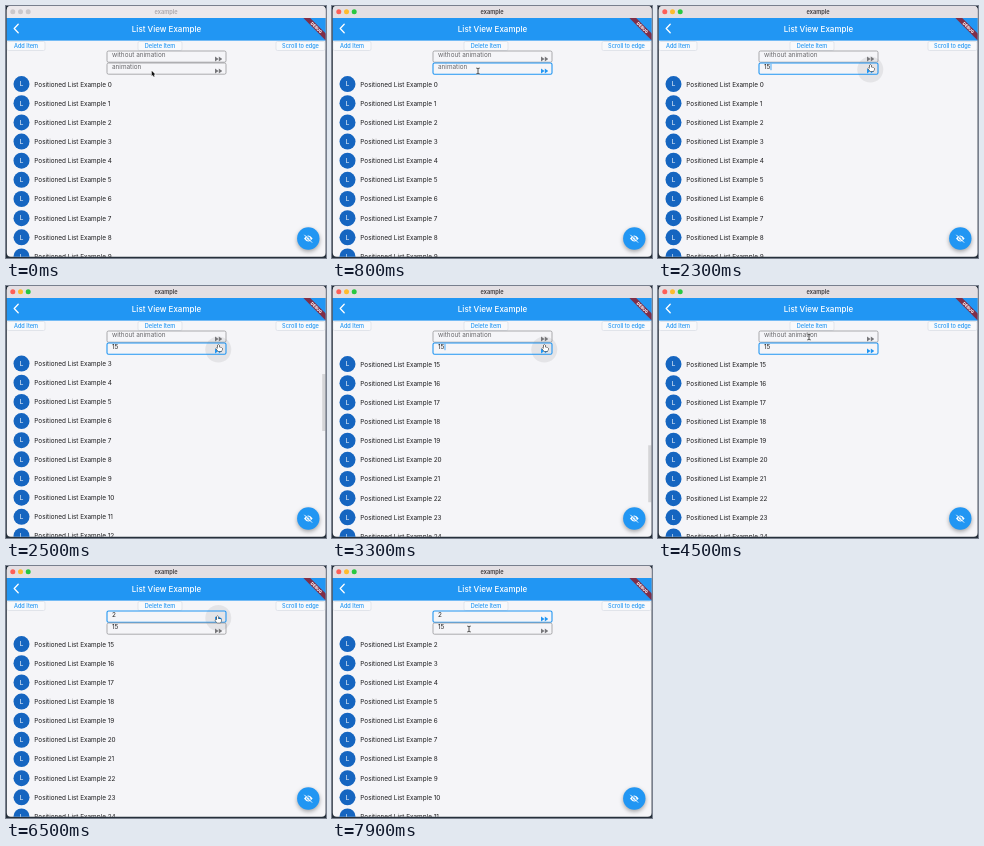
Recreate the animation shown at these times as an HTML page with a canvas. Size 320 by 252 pixels, loop 8 s.

```html
<!DOCTYPE html>
<html lang="en">
<head>
<meta charset="utf-8">
<title>List View Example</title>
<style>
html, body { margin: 0; width: 100%; height: 100%; overflow: hidden; background: #26303b; }
canvas { display: block; width: 320px; height: 252px; }
</style>
</head>
<body>
<canvas id="stage"></canvas>
<script>
const LOOP = 8000, W = 320, H = 252, ROW = 19.15, LIST_TOP = 69;
const BLUE = '#2196f3', PAPER = '#f5f5f8', TAU = Math.PI * 2;
const FONT = 'Inter, "Liberation Sans", sans-serif';
const canvas = document.getElementById('stage');
const g = canvas.getContext('2d');
const dpr = window.devicePixelRatio || 1;
canvas.width = W * dpr;
canvas.height = H * dpr;

// Pointer path: time, x, y
const path = [
  [0, 146, 66], [300, 146, 65], [1750, 146, 65], [2200, 213, 62], [3850, 213, 62],
  [4500, 151, 51], [5850, 151, 51], [6350, 212, 53.5], [7050, 212, 53.5], [7700, 137, 63], [LOOP, 137, 63]
];
const clamp = v => Math.min(1, Math.max(0, v));
const ease = p => p * p * (3 - 2 * p);
const ramp = (t, a, b) => clamp((t - a) / (b - a));

function pointerAt(t) {
  const i = Math.max(1, path.findIndex(k => k[0] >= t));
  const [a, b] = [path[i - 1], path[i]];
  const p = ease(ramp(t, a[0], b[0]));
  return [a[1] + (b[1] - a[1]) * p, a[2] + (b[2] - a[2]) * p];
}

function text(s, x, y, size, color, weight = 400, align = 'left') {
  g.font = `${weight} ${size}px ${FONT}`;
  g.fillStyle = color;
  g.textAlign = align;
  g.textBaseline = 'alphabetic';
  g.fillText(s, x, y);
}
function rect(x, y, w, h, color) {
  g.fillStyle = color;
  g.fillRect(x, y, w, h);
}
function disc(x, y, r, color) {
  g.fillStyle = color;
  g.beginPath();
  g.arc(x, y, r, 0, TAU);
  g.fill();
}
function shape(d, x, y, fill, stroke, width = 1) {
  const p = new Path2D(d);
  g.save();
  g.translate(x, y);
  g.lineWidth = width;
  g.lineCap = g.lineJoin = 'round';
  if (stroke) { g.strokeStyle = stroke; g.stroke(p); }
  if (fill) { g.fillStyle = fill; g.fill(p); }
  g.restore();
}

function list(offset, thumb) {
  g.save();
  g.beginPath();
  g.rect(0, LIST_TOP, W, H - LIST_TOP);
  g.clip();
  const first = Math.max(0, Math.floor(offset) - 1);
  for (let i = first; i < Math.min(31, first + 13); i++) {
    const y = 78.1 + (i - offset) * ROW;
    disc(15.5, y, 8, '#1565c0');
    text('L', 15.5, y + 2.3, 6.4, '#fff', 400, 'center');
    text('Positioned List Example ' + i, 28.3, y + 2.4, 6.4, '#1d1d1f');
  }
  if (thumb > 0) rect(316.2, LIST_TOP + 1 + offset * 5.95, 3.2, 57, `rgba(0,0,0,${0.13 * thumb})`);
  g.restore();
}

function button(label, x, w) {
  g.fillStyle = '#f8f9fb';
  g.strokeStyle = '#d3d9e1';
  g.lineWidth = 0.6;
  g.beginPath();
  g.roundRect(x, 35.5, w, 9, 1.5);
  g.fill();
  g.stroke();
  text(label, x + w / 2, 42.3, 5.6, BLUE, 500, 'center');
}

function field(y, value, hint, focused, caret) {
  g.strokeStyle = focused ? BLUE : '#8b8b8e';
  g.lineWidth = focused ? 1.1 : 0.7;
  g.beginPath();
  g.roundRect(101, y, 119, 11.2, 1.5);
  g.stroke();
  text(value || hint, 106, y + 6.1, 6.4, value ? '#222' : '#67676a');
  if (focused && caret) {
    rect(106.2 + (value ? g.measureText(value).width : 0), y + 0.8, 0.8, 6.4, BLUE);
  }
  shape('M0 0L3.5 2.5L0 5ZM3.8 0L7.3 2.5L3.8 5Z', 209, y + 5.6, focused ? BLUE : '#77777a');
}

function chrome(active) {
  rect(0, 0, W, 12, active ? '#e3dfe3' : '#ece9ec');
  const lights = active ? ['#ff5f57', '#febc2e', '#28c840'] : ['#cbc8cb', '#cbc8cb', '#cbc8cb'];
  lights.forEach((c, i) => disc(6.8 + i * 7.7, 5.8, 2.5, c));
  text('example', 160, 8.1, 5.6, active ? '#3d3a3d' : '#aaa6aa', 600, 'center');
  rect(0, 12, W, 22.6, BLUE);
  shape('M4 0L0 4.2L4 8.4', 8.2, 18.3, null, '#fff', 1.3);
  text('List View Example', 160.5, 25.7, 8, '#fff', 500, 'center');
  g.save();
  g.beginPath();
  g.rect(0, 12, W, 40);
  g.clip();
  g.translate(320, 12);
  g.rotate(Math.PI / 4);
  rect(-18, 11.2, 36, 4.8, 'rgba(150,20,30,.8)');
  text('DEBUG', 0, 15.1, 4.1, '#fff', 800, 'center');
  g.restore();
}

function fab() {
  g.save();
  g.shadowColor = 'rgba(0,0,0,.35)';
  g.shadowBlur = 4 * dpr;
  g.shadowOffsetY = 1.8 * dpr;
  disc(302.3, 232.5, 11.2, BLUE);
  g.restore();
  const eye = 'M-4.3 0Q0 -6.2 4.3 0Q0 6.2 -4.3 0Z';
  shape(eye, 302.3, 232.5, '#fff');
  disc(302.3, 232.5, 2, BLUE);
  disc(302.3, 232.5, 1.2, '#fff');
  shape('M-3.2 -4L4 3.2', 302.3, 232.5, null, BLUE, 1);
  shape('M-3.7 -3.4L3.5 3.8', 302.3, 232.5, null, '#fff', 0.9);
}

function pointer(x, y, kind) {
  if (kind === 'arrow') {
    shape('M0 0V5.2L1.2 4.1L2 6L2.9 5.6L2.1 3.8H3.7Z', x - 0.3, y - 1.2, '#111', '#fff', 0.9);
  } else if (kind === 'beam') {
    const d = 'M-1.4 -2.9Q0 -2.9 0 -2Q0 -2.9 1.4 -2.9M0 -2V2M-1.4 2.9Q0 2.9 0 2Q0 2.9 1.4 2.9';
    shape(d, x, y, null, 'rgba(255,255,255,.7)', 1.6);
    shape(d, x, y, null, '#222', 0.8);
  } else {
    shape('M-1.2 -3Q-.5 -3.9 .1 -3V-.8L2.4 -.4Q3.3 -.1 3.2 .9L2.5 3.2H-.9L-3 .6Q-2.7 -.5 -1.2 .6Z',
      x, y, '#fff', '#222', 1);
  }
}

function draw(t) {
  const active = t >= 350;
  const upper = t >= 4750;
  const low = t < 1150 ? '' : t < 1400 ? '1' : '15';
  const high = t < 5750 ? '' : '2';
  const caret = t % 1000 < 450;
  const offset = t < 6650 ? 15 * ease(ramp(t, 2400, 2750)) : 2;
  const thumb = t < 6650 ? ramp(t, 2400, 2500) * (1 - ramp(t, 3400, 3700))
                         : 1 - ramp(t, 7250, 7550);
  const [x, y] = pointerAt(t);
  const inside = x > 203 && x < 221;

  g.setTransform(dpr, 0, 0, dpr, 0, 0);
  rect(0, 0, W, H, '#26303b');
  g.save();
  g.beginPath();
  g.roundRect(0.8, 0, 318.8, 250.8, 4);
  g.clip();
  rect(0, 0, W, H, PAPER);
  list(offset, thumb);
  button('Add Item', 1, 38);
  button('Delete Item', 132, 44);
  button('Scroll to edge', 270, 49);
  chrome(active);
  if (inside) disc(212.3, y > 57.3 ? 63.5 : 52, 13, 'rgba(0,0,0,.07)');
  field(45, high, 'without animation', upper, caret);
  field(57, low, 'animation', active && !upper, caret);
  fab();
  g.restore();

  const inField = x > 101 && x < 220 && y > 45 && y < 69;
  pointer(x, y, !active || !inField ? 'arrow' : inside ? 'hand' : 'beam');
}

const start = performance.now();
function tick() {
  draw((performance.now() - start) % LOOP);
  requestAnimationFrame(tick);
}
tick();
</script>
</body>
</html>
```
